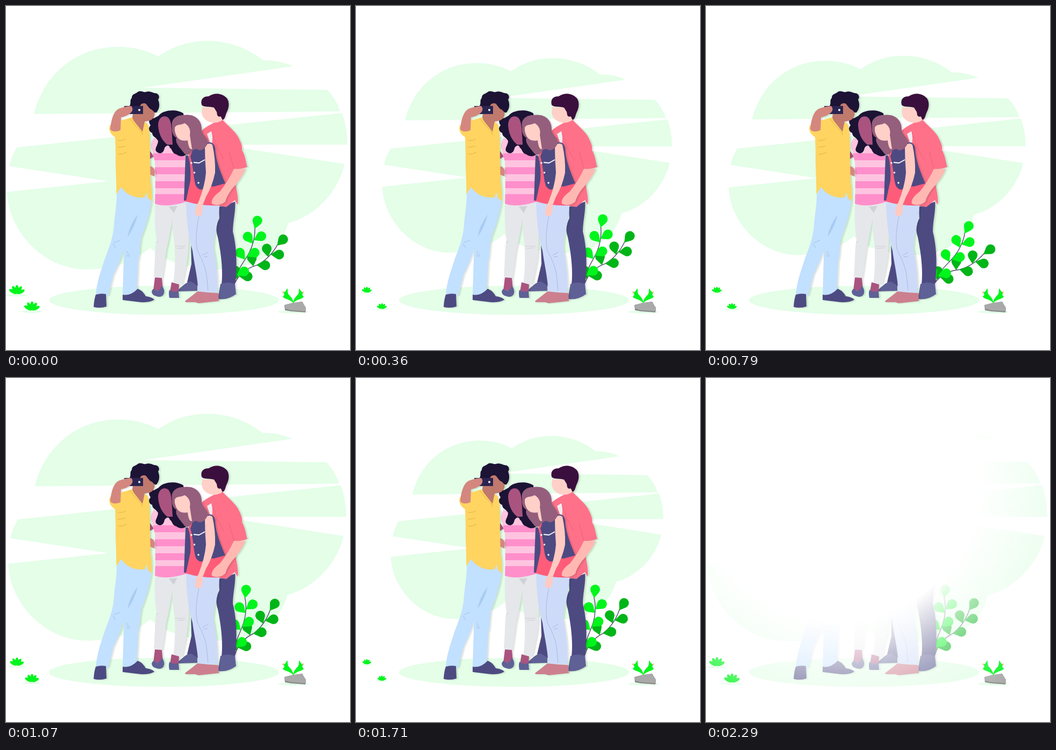
An HTML page for the animation above (2370 ms loop, 640x640 px).

```html
<!DOCTYPE html>
<html lang="en">
<head>
<meta charset="utf-8">
<title>Group selfie</title>
<style>
html, body { margin: 0; height: 100%; overflow: hidden; background: #fff; }
svg { display: block; width: 100vw; height: 100vh; }
.person { filter: drop-shadow(3px 1px 1px rgba(0, 30, 0, .12)); }
.mint { fill: #e4fee8; }
.navy { fill: #4d4a82; }
.slate { fill: #5f6096; }
.ink { fill: #1c1335; }
.peach { fill: #ffd0c8; }
.plum { fill: #aa537f; }
.tan { fill: #d4877f; }
.fold { fill: none; }
</style>
</head>
<body>
<svg viewBox="0 0 640 640">
<defs>
  <radialGradient id="glow">
    <stop offset=".53" stop-color="#fff"/>
    <stop offset=".75" stop-color="#fff" stop-opacity=".5"/>
    <stop offset="1" stop-color="#fff" stop-opacity="0"/>
  </radialGradient>
  <path id="leaf" d="M0 0L-7.400-10.900A9 9 0 1 1 7.400-10.900Z"/>
  <path id="sprout" d="M535 553C528 545 517 545 515 541L518 537 516 533C520 532 522 528 523 525C525 528 523 533 526 537C530 541 534 545 535 553Z"/>
  <g id="tuft">
    <ellipse class="mint" cy="10" rx="20" ry="2.5"/>
    <g id="petals" fill="#00f51c"></g>
  </g>
  <clipPath id="top">
    <path id="shirt" d="M275 245C269 253 269 263 272 268L277 290C278 320 278 345 277 368C295 374 318 370 335 364L333 270L300 255Z"/>
  </clipPath>
</defs>

<g id="cloud" class="mint">
  <path d="M52 201C70 128 130 76 208 76C236 76 262 82 283 94C310 75 340 65 376 65C412 65 450 78 478 101Q508 100 534 112L255 152L598 156Q614 173 622 196Z"/>
  <path d="M20 263L625 199Q635 225 635 258H398L630 294C620 340 580 390 525 404C510 460 460 490 400 490C340 490 295 475 268 450C235 478 195 490 150 490C70 490 5 420 2 346L190 326L6 298Q10 280 20 263Z"/>
</g>
<ellipse class="mint" cx="294" cy="547.5" rx="214" ry="27"/>

<g id="plant" stroke="none">
  <g fill="none" stroke="#4a4a68" stroke-width="1.4">
    <path id="stemA" d="M426 515C428 485 452 470 459 440Q463 425 462 412"/>
    <path id="stemB" d="M426 515Q438 490 466 482Q490 470 505 443"/>
  </g>
</g>
<use id="tuftA" href="#tuft"/>
<use id="tuftB" href="#tuft"/>

<ellipse class="mint" cx="535" cy="569" rx="29" ry="3"/>
<path d="M518 557L534 553L551 550L558 562L557 570L530 568L519 566Z" fill="#858585"/>
<path d="M518 556L534 552L550 550L558 561V568L530 566L519 563Z" fill="#a9a9a9"/>
<g fill="#00f51c">
  <use href="#sprout"/>
  <use href="#sprout" transform="matrix(-1 0 0 1 1069 0)"/>
</g>
<g fill="#ffb27a"><circle cx="515.500" cy="532.500" r="1.500"/><circle cx="552.500" cy="532.500" r="1.500"/></g>

<!-- man in the red shirt -->
<g class="person">
  <path class="navy" d="M344 440L345 480L337 514L357 521L358 470ZM396 374L426 363C428 380 422 400 422 420C430 450 430 490 426 518L401 518C404 490 400 460 394 430C389 415 392 405 397 395Z"/>
  <path class="slate" d="M399 517Q412 512 426 517L428 536Q412 548 394 545ZM320 528C330 520 336 512 345 513L356 520V530L321 531Z"/>
  <path d="M412 362L424 356L426 364L410 370Z" fill="#f4f4f8"/>
  <path d="M364 232C372 224 388 216 402 211C412 222 430 236 434 248C438 256 440 262 439 268C446 280 446 292 449 299C442 303 434 303 427 303L425 320C428 340 433 355 431 370L426 361L410 374L384 370L370 270Z" fill="#ff7189"/>
  <path d="M374 238L382 233Q386 245 382 262Z" fill="#f1eef2"/>
  <path class="fold" d="M384 236Q390 260 405 285M415 270L424 303" stroke="#ee617b"/>
  <path class="peach" d="M365 188Q378 190 388 188L394 202L404 211Q396 218 385 217Q366 214 364 198Z"/>
  <path d="M364 184C361 172 369 168 377 168C388 160 402 163 408 169C416 174 416 188 411 197C408 203 408 210 403 212C400 208 401 204 397 206C392 205 393 201 392 197L387 189C378 186 368 189 364 184Z" fill="#3a0f3d"/>
</g>

<!-- woman in stripes -->
<g class="person">
  <path d="M277 370Q305 372 339 362V400C341 430 340 460 335 485L328 518L311 518C315 490 315 460 313 440C311 425 309 415 310 395C305 420 302 440 298 455L291 506L275 504C278 470 276 455 280 435C276 410 277 390 277 370Z" fill="#e6e7eb"/>
  <path d="M303 373L319 372L312 385Z" fill="#d0d1d6"/>
  <path class="fold" d="M279 440L284 438M314 447H334M318 451L332 450" stroke="#cfd0d5"/>
  <path class="plum" d="M277 505L290 506L292 528L274 530ZM308 514L322 518L321 533L305 532ZM268 270L275 280L267 285Z"/>
  <path class="slate" d="M272 529Q274 524 277 528Q285 533 290 520Q297 530 293 537Q288 543 280 540Q271 538 271 531ZM304 528Q312 534 321 530L322 543L304 543Q302 535 304 528Z"/>
  <use href="#shirt" fill="#ffc4e0"/>
  <path d="M304 274V380" clip-path="url(#top)" stroke="#ff8fcb" stroke-width="76" stroke-dasharray="13 13 13 13 13 11 30"/>
  <path class="ink" d="M284 204C292 193 318 191 330 200L336 276C330 281 322 280 317 276C308 274 310 266 305 264C303 256 297 260 295 264C293 275 286 276 280 271C275 266 283 259 283 251C279 243 272 244 272 236C264 233 265 226 269 222C262 213 270 206 275 209Z"/>
  <path class="plum" d="M283 222C283 208 292 203 299 206C308 210 308 225 309 240L310 258L300 258C290 250 284 238 283 222Z"/>
</g>

<!-- woman in the denim vest -->
<g class="person">
  <path d="M335 364L397 371C397 400 386 425 386 450C392 480 395 510 393 533L357 532C358 510 350 480 347 455C339 430 336 400 335 364Z" fill="#cddbf9"/>
  <path class="fold" d="M360 385Q350 430 356 455Q370 480 373 500L376 530M366 464L376 458M368 467L375 466" stroke="#a9badf"/>
  <path d="M333 549Q345 540 356 531L376 533L395 534L396 549L358 553L352 551L334 551Z" fill="#cc7f8f"/>
  <path d="M341 266L333 363Q365 373 397 371Q400 350 410 334L386 280Z" fill="#ff5c7a"/>
  <path class="navy" d="M334 278L339 278Q345 300 343 325L335 362H331ZM347 268L376 254Q386 252 389 264C390 290 402 315 408 330L386 336C376 333 364 349 355 337C349 330 350 305 343 280Z"/>
  <path d="M349 291L359 292L370 286" fill="none" stroke="#fff" stroke-width="1.800"/>
  <g fill="#fff"><circle cx="345" cy="292" r="1.700"/><circle cx="350.500" cy="310" r="1.700"/><circle cx="358" cy="329" r="1.700"/></g>
  <path d="M424 303L446 303Q438 322 420 341Q410 355 408 364Q396 374 383 368Q380 358 398 345Q414 325 424 303Z" fill="#ffb9b2"/>
  <path d="M370 262Q376 252 384 258Q390 285 389 310Q384 335 372 355L366 370Q367 385 362 390Q356 393 352 388Q351 375 358 365Q370 335 372 310Q370 285 370 262Z" fill="#ffcac2"/>
  <path d="M309 225C306 210 318 202 332 203C350 200 364 212 364 228C364 240 374 243 376 252C374 262 366 270 358 268C353 264 348 267 345 271C340 280 332 277 330 272C322 262 314 254 317 245C311 242 308 235 309 225Z" fill="#955e7c"/>
  <path class="peach" d="M314 226C318 219 326 222 332 218C340 222 344 230 342 240L346 266Q340 268 338 250Q318 254 314 232Z"/>
</g>

<!-- man with the phone -->
<g class="person">
  <path d="M206 350L214 337L258 350L271 362C268 385 260 410 252 430C248 450 250 460 246 475L243 535L217 538L219 470C219 450 222 440 226 430C218 460 210 480 200 500L190 539L167 540C168 515 176 495 184 470C196 440 200 425 201 405C203 385 206 370 206 350Z" fill="#c2e0ff"/>
  <path d="M245 388Q230 408 226 430Q240 410 245 388Z" fill="#a9cbef"/>
  <path class="fold" d="M199 442L204 450M201 440L212 436M225 456L230 466M224 462L228 467" stroke="#a3c2e4"/>
  <path class="navy" d="M167 537Q176 534 186 536L187 559Q176 563 163 560Q164 545 167 537ZM217 537Q232 540 245 526Q255 530 260 540Q270 541 276 546Q270 552 250 551L217 547Z"/>
  <path class="tan" d="M266 297Q277 300 277 308L276 317L266 313Z"/>
  <path d="M193 222L214 213L238 206L262 218Q267 225 267 240C268 270 268 300 269 325Q272 345 271 363L264 357L261 345L258 356Q236 358 222 346L214 337L205 350C206 320 203 300 204 275L203 244Q193 238 192 228Z" fill="#ffd460"/>
  <path class="fold" d="M208 250Q218 251 223 247M208 263L222 261M209 276Q218 276 224 272M230 209Q240 222 252 234L254 240" stroke="#dfb44b"/>
  <path d="M246 188Q254 176 262 181L276 194Q279 208 268 213L258 215L254 234L238 214Q232 206 238 198Z" fill="#c0796d"/>
  <path class="ink" d="M229 187C234 181 229 176 234 171C234 163 241 164 245 160C251 156 255 161 260 160C267 157 272 161 276 162C284 162 287 169 283 174C287 184 285 192 280 198C275 200 274 193 269 192C264 188 262 182 258 181Q250 180 249 188Z"/>
  <path d="M220 186H255V201H220Z" fill="#2a2550"/>
  <circle cx="248" cy="193.500" r="2" fill="#fff"/>
  <path class="tan" d="M194 228C196 210 200 196 210 191Q220 187 233 186Q238 192 233 198Q224 206 214 207L213 231Q202 236 195 231Z"/>
</g>

<circle id="flash" cx="248" cy="194" fill="url(#glow)"/>
</svg>

<script>
const LOOP = 2370, STEP = 1000 / 14, LAST = 32, BEAT = 8;
const { PI, sin, cos, abs, max, min, floor } = Math;
const $ = id => document.getElementById(id);

function add(parent, tag, attrs) {
  const el = document.createElementNS('http://www.w3.org/2000/svg', tag);
  for (const k in attrs) el.setAttribute(k, attrs[k]);
  parent.append(el);
}

// Pairs of leaves spread about the stem's lean, one more at the tip
function growLeaves(stem, lean, fill) {
  const grow = (t, angle) => {
    const { x, y } = stem.getPointAtLength(t * stem.getTotalLength());
    add($('plant'), 'use', { href: '#leaf', fill, transform: `translate(${x} ${y}) rotate(${angle})` });
  };
  for (const t of [.1, .46, .76])
    for (const side of [-1, 1]) grow(t + .03 * side, lean + 50 * side);
  grow(.98, lean + 4);
}
growLeaves($('stemB'), 40, '#00b518');
growLeaves($('stemA'), 13, '#00f51c');

for (let i = -2; i <= 2; i++)
  add($('petals'), 'ellipse', { cy: -8, rx: 3.2, ry: 8, transform: `translate(0 7) rotate(${i * 32 + 2})` });

const zoom = (id, x, y, s) => $(id).setAttribute('transform', `translate(${x} ${y}) scale(${s}) `);

function draw(now) {
  const n = min(LAST, floor((now % LOOP + 5) / STEP));

  const s = .9 + .1 * cos(PI / BEAT * (n + .35 * sin(PI * n / 16)));
  zoom('cloud', 317 * (1 - s), 280 * (1 - s), s);

  // The sway starts a quarter turn ahead and settles into the beat
  const turn = n / BEAT + max(0, .25 - n / 80);
  $('plant').setAttribute('transform', `rotate(${.45 - 10.95 * cos(2 * PI * turn)} 426 515)`);

  const size = .56 + .44 * abs(1 - n / BEAT % 2) ** 2;
  zoom('tuftA', 20, 528, size);
  zoom('tuftB', 48, 558.5, size);

  $('flash').setAttribute('r', max(0, 61 * (n - 24)));
}

const start = performance.now();
function tick() {
  draw(performance.now() - start);
  requestAnimationFrame(tick);
}
tick();
</script>
</body>
</html>
```
